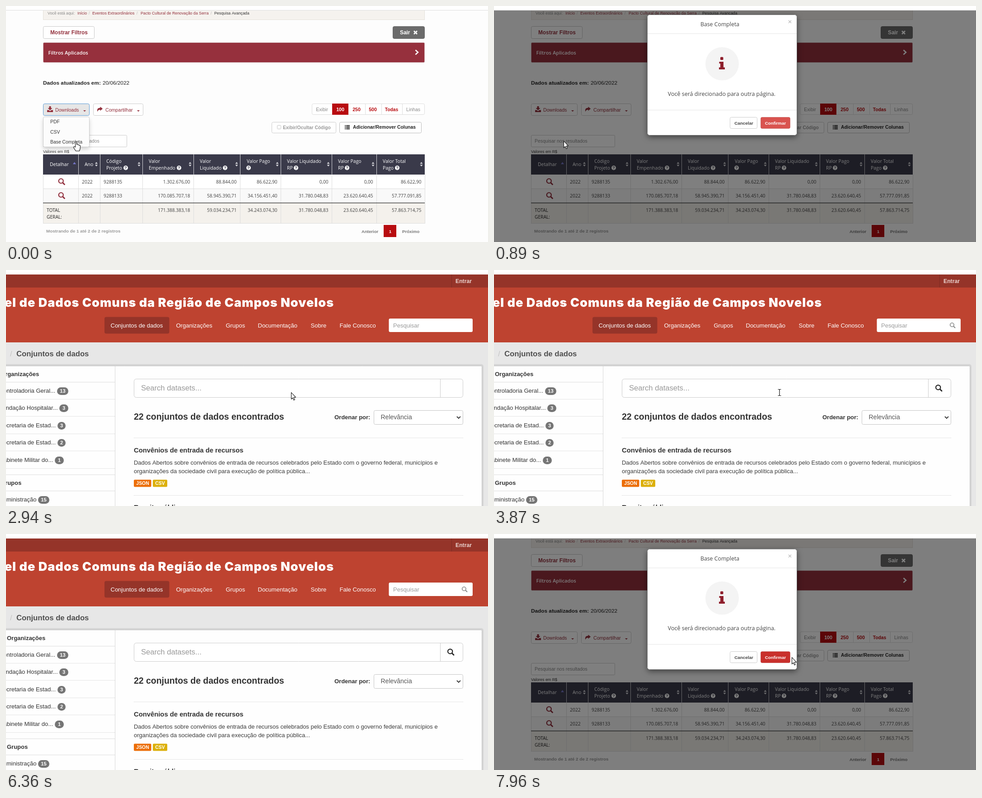
An HTML page with a canvas for the animation above (8 s loop, 1067x525 px).

```html
<!DOCTYPE html>
<html lang="pt-BR">
<head>
<meta charset="utf-8">
<title>Base completa</title>
<style>
html, body { margin: 0; width: 100%; height: 100%; overflow: hidden; background: #fff; }
canvas { display: block; }
</style>
</head>
<body>
<canvas id="stage" width="1067" height="525"></canvas>
<script>
const W = 1067, H = 525, LOOP = 8000, TOP = 10;
const g = document.getElementById('stage').getContext('2d');

const arial = (px, weight = 400) => `${weight} ${px}px "Liberation Sans", Arial, sans-serif`;
const humanist = (px, weight = 400) => `${weight} ${px}px "Open Sans", "Noto Sans", sans-serif`;
const wine = '#93303c', red = '#b80c10', brick = '#953429';

function text(s, x, y, font, color, align = 'left') {
  g.font = font;
  g.fillStyle = color;
  g.textAlign = align;
  g.fillText(s, x, y);
}

function rect(x, y, w, h, color) {
  g.fillStyle = color;
  g.fillRect(x, y, w, h);
}

function box(x, y, w, h, fill, border, r = 3) {
  g.beginPath();
  g.roundRect(x + .5, y + .5, w - 1, h - 1, r);
  if (fill) { g.fillStyle = fill; g.fill(); }
  if (border) { g.strokeStyle = border; g.lineWidth = 1; g.stroke(); }
}

function pill(x, y, w, h, color, r) {
  g.beginPath();
  g.roundRect(x, y, w, h, r);
  g.fillStyle = color;
  g.fill();
}

function poly(points, color) {
  g.beginPath();
  points.forEach(([x, y]) => g.lineTo(x, y));
  g.closePath();
  g.fillStyle = color;
  g.fill();
}

function line(points, color, width) {
  g.beginPath();
  points.forEach(([x, y]) => g.lineTo(x, y));
  g.strokeStyle = color;
  g.lineWidth = width;
  g.stroke();
}

function disc(x, y, r, color) {
  g.beginPath();
  g.arc(x, y, r, 0, 7);
  g.fillStyle = color;
  g.fill();
}

function dotted(x1, x2, y) {
  g.setLineDash([1, 1]);
  line([[x1, y + .5], [x2, y + .5]], '#ccc', 1);
  g.setLineDash([]);
}

// ---- icons ----
function magnifier(x, y, r, color, width) {
  g.beginPath();
  g.arc(x - r * .25, y - r * .25, r, 0, 7);
  g.strokeStyle = color;
  g.lineWidth = width;
  g.stroke();
  line([[x + r * .5, y + r * .5], [x + r * 1.45, y + r * 1.45]], color, width * 1.25);
}

function caret(x, y, color) {
  poly([[x - 3, y], [x + 3, y], [x, y + 3]], color);
}

function sorter(x, y) {
  poly([[x - 3, y - 1], [x + 3, y - 1], [x, y - 5]], '#d5d5da');
  poly([[x - 3, y + 1], [x + 3, y + 1], [x, y + 5]], '#d5d5da');
}

function help(x, y) {
  disc(x, y, 5, '#fff');
  text('?', x, y + 3.2, arial(9, 700), '#3a3a4a', 'center');
}

function downloadIcon(x, y) {
  poly([[x + 4.5, y], [x + 8.5, y], [x + 8.5, y + 4], [x + 11.5, y + 4],
        [x + 6.5, y + 9], [x + 1.5, y + 4], [x + 4.5, y + 4]], wine);
  poly([[x, y + 8.5], [x + 3.5, y + 8.5], [x + 6.5, y + 11], [x + 9.5, y + 8.5],
        [x + 13, y + 8.5], [x + 13, y + 13], [x, y + 13]], wine);
}

function shareIcon(x, y) {
  g.beginPath();
  g.moveTo(x + 13, y + 4.5);
  g.lineTo(x + 7.5, y);
  g.lineTo(x + 7.5, y + 2.5);
  g.quadraticCurveTo(x - 1, y + 2.5, x + 1.5, y + 11.5);
  g.quadraticCurveTo(x + 2, y + 6.8, x + 7.5, y + 6.8);
  g.lineTo(x + 7.5, y + 9.2);
  g.fillStyle = wine;
  g.fill();
}

// ---- results page ----
const cols = [82, 160, 208, 302, 415, 518, 608, 721, 820, 927];
const heads = [
  [222, 'Código', 'Projeto', 265], [316, 'Valor', 'Empenhado', 383],
  [429, 'Valor', 'Liquidado', 485], [533, 'Valor Pago', '', 537],
  [622, 'Valor Liquidado', 'RP', 642], [735, 'Valor Pago', 'RP', 755],
  [834, 'Valor Total', 'Pago', 866]
];
const rows = [
  [395, '9288135', '1.302.676,00 88.844,00 86.622,90 0,00 0,00 86.622,90'],
  [426, '9288133', '170.085.707,18 58.945.390,71 34.156.451,40 31.780.048,83 23.620.640,45 57.777.091,85'],
  [458, '', '171.388.383,18 59.034.234,71 34.243.074,30 31.780.048,83 23.620.640,45 57.863.714,75']
];

function table() {
  rect(82, 375, 845, 31, '#fff');
  rect(82, 406, 845, 32, '#f9f9f9');
  rect(82, 438, 845, 46, '#f4f1ec');
  cols.forEach(x => rect(x, 375, 1, 109, '#ddd'));
  rect(82, 406, 845, 1, '#ddd');
  rect(82, 483, 845, 1, '#ddd');
  rect(82, 437.5, 845, 1.2, '#222');
  rect(82, 330, 845, 45, '#3a3a4a');
  cols.slice(1, -1).forEach(x => rect(x, 330, 1, 45, '#d4d4d8'));

  const f = humanist(10.4), white = '#fff';
  text('Detalhar', 97, 356, f, white);
  poly([[148, 352], [155, 352], [151.5, 347]], '#7474c4');
  text('Ano', 174, 356, f, white);
  sorter(200, 352);
  heads.forEach(([x, a, b, hx], i) => {
    text(a, x, 349, f, white);
    text(b, x, 364, f, white);
    help(hx, 360);
    sorter(cols[i + 3] - 7.5, 352);
  });
  rows.forEach(([y, code, values]) => {
    if (code) {
      magnifier(123, y - 4.5, 5, '#8e2a38', 2.2);
      text('2022', 168, y, humanist(10.4), '#444');
      text(code, 216, y, humanist(10.3), '#444');
    }
    values.split(' ').forEach((v, i) =>
      text(v, cols[i + 4] - 7.5, y, humanist(10.1), '#444', 'right'));
  });
  text('TOTAL', 90, 458, humanist(10.2), '#222');
  text('GERAL:', 90, 473, humanist(10.2), '#222');
}

function results(menuOpen) {
  rect(0, TOP, W, H - TOP, '#fdfdfd');
  rect(0, 9, W, 1, '#ddd');

  rect(82, TOP, 845, 21, '#e4e0da');
  rect(83, TOP, 843, 20, '#f5f2ee');
  const crumb = arial(8.8);
  text('Você está aqui:', 92, 18.5, crumb, '#888');
  text('Início', 158, 18.5, crumb, wine);
  text('Eventos Extraordinários', 191, 18.5, crumb, wine);
  text('Pacto Cultural de Renovação da Serra', 298, 18.5, crumb, wine);
  text('Pesquisa Avançada', 461, 18.5, crumb, '#333');
  [183, 289, 453].forEach(x => text('/', x, 18.5, crumb, '#bbb'));

  box(82, 45, 114, 28, '#fff', '#c8c8c8');
  text('Mostrar Filtros', 98, 63, arial(11.85, 700), wine);
  box(856, 45, 71, 28, '#6b6b6b', '#646464');
  text('Sair', 872, 63, arial(11.85, 700), '#fff');
  line([[903, 55.5], [910, 62.5]], '#fff', 2.6);
  line([[910, 55.5], [903, 62.5]], '#fff', 2.6);

  box(82, 81, 845, 45, '#96303d', '#c9a5aa', 2);
  text('Filtros Aplicados', 93.5, 107.5, humanist(11.2, 600), '#fff');
  line([[906.5, 98], [912, 103], [906.5, 108]], '#fff', 2.6);

  text('Dados atualizados em:', 82, 175, arial(11.8, 700), '#222');
  text('20/06/2022', 214, 175, arial(11.8), '#222');

  box(82, 217, 103, 27, menuOpen ? '#e6e6e6' : '#fff', menuOpen ? '#5a9bd5' : '#ccc');
  downloadIcon(91, 223);
  text('Downloads', 109, 235, arial(10.6), wine);
  caret(174, 232, wine);
  box(193, 217, 111, 27, '#fff', '#ccc');
  shareIcon(201, 224);
  text('Compartilhar', 220, 235, arial(10.6), wine);
  caret(293, 232, wine);

  box(677, 217, 250, 25, '#fff', '#ddd');
  rect(722, 217, 36, 25, red);
  [795, 831, 877].forEach(x => rect(x, 217, 1, 25, '#ddd'));
  text('Exibir', 699.5, 234, arial(10.6), '#888', 'center');
  text('100', 740, 234, arial(10.6, 700), '#fff', 'center');
  text('250', 776, 234, arial(10.6, 700), red, 'center');
  text('500', 812, 234, arial(10.6, 700), red, 'center');
  text('Todas', 853.5, 234, arial(10.3, 700), red, 'center');
  text('Linhas', 901.5, 234, arial(10.6), '#888', 'center');

  box(588, 258, 143, 25, '#fff', '#ccc');
  box(600, 265, 9, 9, '#fff', '#c4c4c4', 1);
  text('Exibir/Ocultar Código', 613, 274, arial(10.3, 700), '#999');
  box(738, 258, 182, 25, '#fff', '#bbb');
  for (let y = 265; y < 275; y += 2.6) {
    rect(750, y, 2, 1.6, '#222');
    rect(753, y, 8, 1.6, '#222');
  }
  text('Adicionar/Remover Colunas', 768, 273, arial(10.38, 700), '#222');

  box(82, 287, 186, 27, '#fff', '#ccc', 2);
  text('Pesquisar nos resultados', 90, 304, arial(10.4), '#888');
  text('Valores em R$', 82, 327, arial(8.9), '#333');

  table();

  text('Mostrando de 1 até 2 de 2 registros', 89, 504, arial(9.8, 700), '#999');
  text('Anterior', 787, 504.5, arial(9.6, 700), '#777');
  rect(836, 487, 28, 27, red);
  text('1', 850.5, 504.5, arial(9.8, 700), '#fff', 'center');
  text('Próximo', 877, 504.5, arial(9.6, 700), '#777');
}

function menu() {
  g.save();
  g.shadowColor = 'rgba(0,0,0,.18)';
  g.shadowBlur = 10;
  g.shadowOffsetY = 5;
  box(82, 246, 103, 68, '#fcfcfc', null);
  g.restore();
  box(82, 246, 103, 68, '#fcfcfc', '#ccc');
  text('PDF', 98, 261, arial(10.4), '#333');
  text('CSV', 98, 283.5, arial(10.4), '#333');
  text('Base Completa', 98, 305.5, arial(10.4), '#333');
}

function modal(dy, alpha, confirm) {
  g.save();
  g.beginPath();
  g.rect(0, TOP, W, H);
  g.clip();
  g.globalAlpha = alpha;
  g.translate(0, dy);
  g.save();
  g.shadowColor = 'rgba(0,0,0,.5)';
  g.shadowBlur = 13;
  g.shadowOffsetY = 4;
  box(339, 33, 332, 269, '#fff', null, 5);
  g.restore();
  box(339, 33, 332, 269, '#fff', '#777', 5);
  text('Base Completa', 500, 59, humanist(12.3), '#444', 'center');
  line([[652, 46], [658, 52]], '#bbb', 1.3);
  line([[658, 46], [652, 52]], '#bbb', 1.3);
  rect(340, 75, 330, 1, '#e5e5e5');
  disc(505, 142.5, 37, '#f4f4f4');
  const dark = '#8e1f2c';
  box(500.5, 127, 7.5, 7.5, dark, null, 1.5);
  poly([[498.5, 138], [508, 138], [508, 150.5], [511, 150.5], [511, 155],
        [498, 155], [498, 150.5], [501, 150.5], [501, 142], [498.5, 142]], dark);
  text('Você será direcionado para outra página.', 504, 213.5, humanist(12.5), '#444', 'center');
  rect(340, 245, 330, 1, '#e5e5e5');
  box(522, 261, 61, 26, '#fff', '#ccc');
  text('Cancelar', 553, 277.5, arial(9.9, 700), '#444', 'center');
  box(590, 261, 66, 26, confirm, 'rgba(150,20,20,.35)');
  text('Confirmar', 623, 277.5, arial(9.7, 700), '#fff', 'center');
  g.restore();
}

// ---- dataset portal ----
function badge(x, w, y, label) {
  pill(x, y - 8, w, 17, '#757575', 8.5);
  text(label, x + w / 2, y + 4, arial(11.2, 700), '#fff', 'center');
}

const facets = [
  ['Controladoria Geral...', 109, 113, 25, '13'],
  ['Fundação Hospitalar...', 114.5, 118, 20, '3'],
  ['Secretaria de Estad...', 110, 114, 18, '3'],
  ['Secretaria de Estad...', 110, 114, 18, '2'],
  ['Gabinete Militar do...', 104, 108, 20, '1']
];

function portal(icons) {
  rect(0, TOP, W, H - TOP, '#e7e7e7');
  rect(0, TOP, W, 29, brick);
  rect(986, TOP, 1, 29, '#7e2b22');
  text('Entrar', 995, 29, arial(12.2, 700), '#ead3cf');
  rect(0, 39, W, 122, '#be4330');
  g.letterSpacing = '1px';
  text('Painel de Dados Comuns da Região de Campos Novelos', 726, 82,
    '900 27px Inter, "Liberation Sans", sans-serif', '#fff', 'right');
  g.letterSpacing = '0px';

  pill(218, 104.5, 143.5, 37, brick, 4);
  [['Conjuntos de dados', 232], ['Organizações', 377], ['Grupos', 487], ['Documentação', 558],
   ['Sobre', 675], ['Fale Conosco', 739]]
    .forEach(([s, x]) => text(s, x - .5, 128, arial(13), '#fff'));
  pill(847.5, 108, 185.5, 30, '#fff', 3);
  text('Pesquisar', 857, 128, arial(13), '#999');

  text('/', 9, 191.5, arial(16), '#c4c4c4');
  text('Conjuntos de dados', 23, 191.5, arial(16.7, 700), '#505050');

  pill(-20, 209.5, 1077, 400, '#d4d4d4', 5);
  box(-20, 213, 1074, 400, '#fefefe', '#c8c8c8', 2);
  rect(241, 214, 1, 311, '#d8d8d8');

  // headings sit further left until their icons load
  const hx = icons ? 2 : -12;
  text('Organizações', hx, 236, arial(13, 700), '#333');
  rect(0, 249, 241, 1, '#ddd');
  facets.forEach(([s, end, x, w, n], i) => {
    const y = Math.round(269 + i * 38.4);
    text(s, end, y + 4, arial(13), '#333', 'right');
    badge(x, w, y, n);
    dotted(0, 241, y + 18);
  });
  rect(0, 455, 241, 1, '#ddd');
  text('Grupos', hx, 478, arial(13, 700), '#333');
  rect(0, 491, 241, 1, '#ddd');
  text('Administração', 67.5, 515, arial(13), '#333', 'right');
  badge(71, 25, 511, '15');

  box(283, 242, 729, 42, '#fff', '#ccc', 5);
  rect(961, 242, 1, 42, '#ccc');
  text('Search datasets...', 299, 268, arial(16.6), '#999');
  if (icons) {
    magnifier(1015, 123, 4.2, '#8a8a8a', 1.7);
    magnifier(984.5, 262.5, 5.1, '#222', 2.2);
  }
  text('22 conjuntos de dados encontrados', 283, 333, arial(19.45, 700), '#333');
  text('Ordenar por:', 727, 332, arial(13, 700), '#333');
  box(814, 312, 198, 32, '#fff', '#c4c4c4', 3);
  text('Relevância', 829.5, 332, arial(14), '#555');
  line([[998, 326], [1002, 330], [1006, 326]], '#333', 1.8);

  dotted(283, 1012, 373);
  text('Convênios de entrada de recursos', 283, 406, arial(14.8, 700), '#333');
  text('Dados Abertos sobre convênios de entrada de recursos celebrados pelo Estado com o governo federal, municípios e',
    283, 433, arial(12.97), '#3a3a3a');
  text('organizações da sociedade civil para execução de política pública...', 283, 452, arial(12.97), '#3a3a3a');
  pill(283, 466.5, 38.5, 16, '#ec6e08', 2);
  text('JSON', 302.5, 478, arial(10.4, 700), '#fff', 'center');
  pill(325, 466.5, 32, 16, '#dcb00c', 2);
  text('CSV', 341, 478, arial(10.4, 700), '#fff', 'center');
  dotted(283, 1012, 501);
  text('Receita pública', 283, 532.5, arial(14.8, 700), '#333');
}

// ---- pointers ----
function outline(fill, path) {
  path();
  g.closePath();
  g.lineJoin = 'round';
  g.fillStyle = fill;
  g.fill();
  g.strokeStyle = '#111';
  g.lineWidth = 1.1;
  g.stroke();
}

const pointers = {
  arrow() {
    outline('#fff', () => {
      g.beginPath();
      [[.5, .5], [.5, 15.3], [3.7, 12.3], [6, 17.6], [8.3, 16.6], [6, 11.4], [10.4, 11.2]]
        .forEach(([x, y]) => g.lineTo(x, y));
    });
  },
  hand() {
    outline('#fff', () => {
      g.beginPath();
      g.moveTo(-1.5, 13);
      g.lineTo(-1.5, 2);
      g.quadraticCurveTo(0, -.5, 1.5, 2);
      g.lineTo(1.5, 7);
      g.quadraticCurveTo(3.5, 6, 4.5, 8);
      g.quadraticCurveTo(6.5, 7, 7.2, 9);
      g.quadraticCurveTo(9.5, 8.5, 9.5, 11);
      g.lineTo(9.2, 16);
      g.lineTo(7.5, 21.5);
      g.lineTo(-.5, 21.5);
      g.lineTo(-5.3, 14);
      g.quadraticCurveTo(-5.5, 11, -3, 12);
    });
  },
  beam() {
    line([[-3.5, -6.5], [-1, -6.5], [0, -5.5], [1, -6.5], [3.5, -6.5]], '#222', 1.2);
    line([[-3.5, 7.5], [-1, 7.5], [0, 6.5], [1, 7.5], [3.5, 7.5]], '#222', 1.2);
    line([[0, -6], [0, 7]], '#222', 1.3);
  }
};

// time, pointer, x, y: each pose holds until the next
const poses = [
  [0, 'hand', 155, 301], [770, 'arrow', 154, 300],
  [1400, 'arrow', 205, 298], [1520, 'arrow', 335, 291], [1640, 'arrow', 490, 284],
  [1760, 'arrow', 598, 279], [1880, 'arrow', 631, 277], [2280, 'arrow', 631, 272],
  [3450, 'beam', 632, 272],
  [5220, 'beam', 612, 269], [5340, 'beam', 548, 260], [5460, 'beam', 465, 251], [5580, 'arrow', 413, 235],
  [5730, 'arrow', 370, 201], [5850, 'arrow', 260, 122], [5970, 'arrow', 155, 58],
  [6090, 'arrow', 119, 24], [6210, 'arrow', 159, 13], [6360, '', 0, 0],
  [7580, 'arrow', 145, -5], [7720, 'arrow', 400, 140], [7840, 'arrow', 714, 277], [7960, 'arrow', 659, 274]
];

function pointer(t) {
  const [, kind, x, y] = poses.findLast(p => p[0] <= t);
  if (!kind) return;
  g.save();
  g.translate(x, y);
  pointers[kind]();
  g.restore();
}

function confirmColor(t) {
  if (t < 1760) return '#d9534f';
  return t >= 2160 && t < 2280 ? '#b52b27' : '#c9302c';
}

function draw(t) {
  rect(0, 0, W, H, '#fff');
  if (t < 2430 || t >= 7200) {
    const open = t < 770;
    results(open);
    if (t >= 500) rect(0, TOP, W, H, `rgba(0,0,0,${t < 630 ? .2 : .5})`);
    if (open) menu();
    else if (t < 890) modal(-48, .5, confirmColor(t));
    else modal(t < 1010 ? -14 : 0, 1, confirmColor(t));
  } else if (t >= 2940) {
    portal(t >= 3260);
  }
  pointer(t);
}

const start = performance.now();
function tick() {
  draw((performance.now() - start) % LOOP);
  requestAnimationFrame(tick);
}
tick();
</script>
</body>
</html>
```
